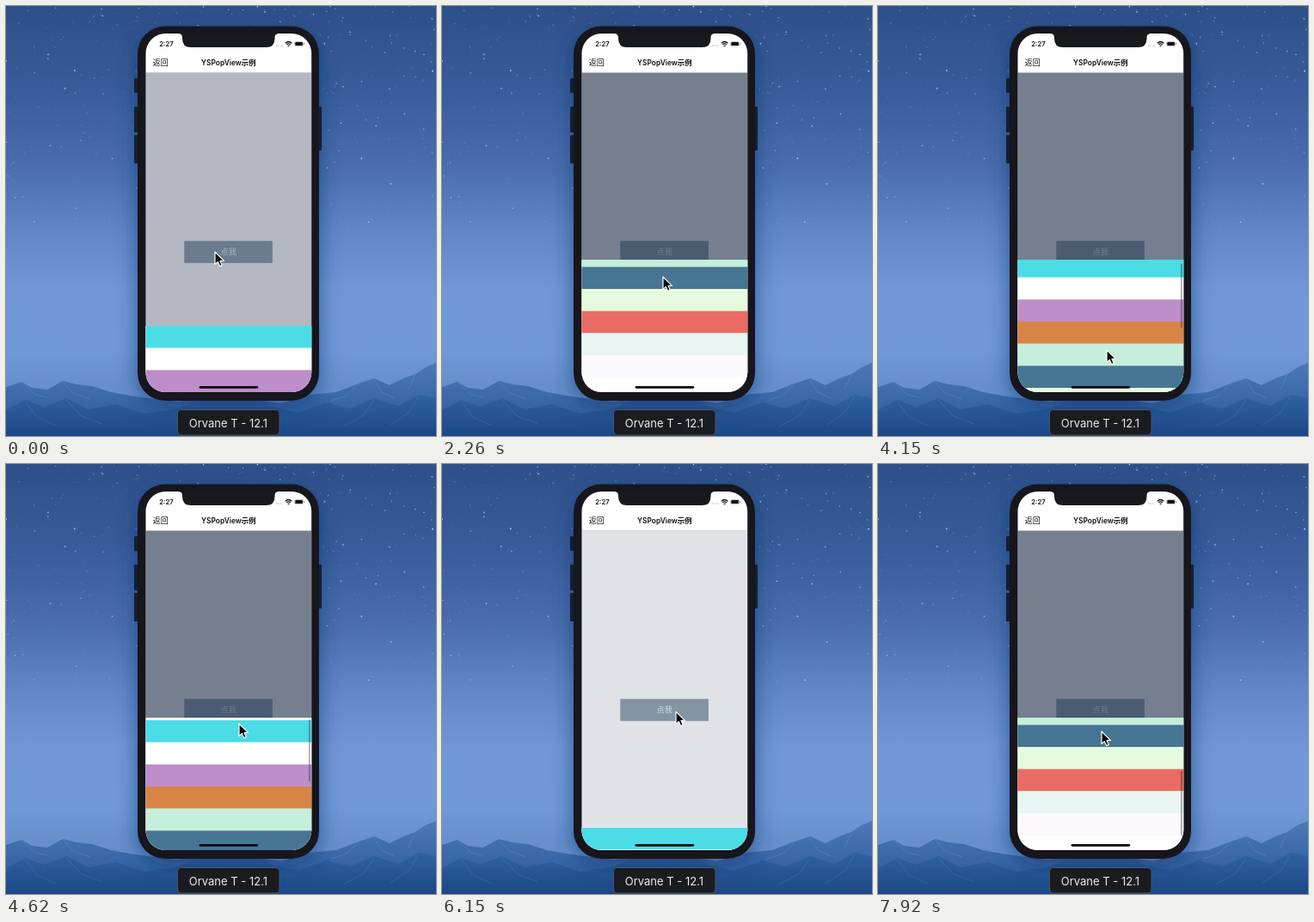
An HTML page that plays this animation: 500x500 px, repeating every 8000 ms.

```html
<!DOCTYPE html>
<html lang="zh">
<head>
<meta charset="utf-8">
<title>YSPopView示例</title>
<style>
  html, body { margin: 0; width: 100%; height: 100%; overflow: hidden; background: #2f528a; }
  svg { display: block; width: 100vw; height: 100vh; }
  text { font-family: Inter, "Noto Sans CJK SC", "Noto Sans CJK", sans-serif; }
</style>
</head>
<body>
<svg id="stage" viewBox="0 0 500 500">
  <defs>
    <linearGradient id="sky" x2="0" y2="1">
      <stop offset="0" stop-color="#2e5089"/>
      <stop offset=".2" stop-color="#395d9b"/>
      <stop offset=".38" stop-color="#4a6eae"/>
      <stop offset=".52" stop-color="#6086c6"/>
      <stop offset=".66" stop-color="#7197d6"/>
      <stop offset=".8" stop-color="#7099d8"/>
      <stop offset=".88" stop-color="#668fcc"/>
    </linearGradient>
    <linearGradient id="far" x2="0" y2="1">
      <stop offset="0" stop-color="#4c78b6"/>
      <stop offset="1" stop-color="#28579a"/>
    </linearGradient>
    <linearGradient id="near" x2="0" y2="1">
      <stop offset="0" stop-color="#2f62a3"/>
      <stop offset="1" stop-color="#1c4786"/>
    </linearGradient>
    <filter id="shade" x="-30%" y="-20%" width="160%" height="140%">
      <feDropShadow dx="0" dy="7" stdDeviation="13" flood-color="#17336c" flood-opacity=".6"/>
    </filter>
    <clipPath id="screen"><rect x="162.5" y="32" width="192.7" height="417" rx="23"/></clipPath>
    <clipPath id="list"><rect id="window" x="162" y="295" width="194" height="154"/></clipPath>
  </defs>

  <rect width="500" height="500" fill="url(#sky)"/>
  <g id="stars" fill="#dce9ff"/>
  <path fill="url(#far)" d="M0 443L18 437 30 444 48 446 66 436 82 440 100 442 122 449 150 454 200 460 258 452 320 462 352 452 384 449 410 439 428 433 446 441 462 433 476 428 488 420 500 415V500H0Z"/>
  <path fill="url(#near)" d="M0 470L22 458 44 466 70 456 96 469 128 463 160 474 200 468 226 456 250 452 290 455 310 466 340 473 372 461 400 468 428 456 456 465 480 452 500 456V500H0Z"/>
  <g fill="none" stroke="#6c95cb" stroke-opacity=".4">
    <path d="M18 438L34 452 48 455M66 437L78 450 98 457M410 440L396 453 378 459M428 435L437 449 452 456M476 429L468 446"/>
    <path d="M22 459L36 478 58 488M70 458L88 477 112 486M428 458L416 476 392 489M480 454L468 473 446 488" stroke-opacity=".25"/>
  </g>

  <g fill="#18191c">
    <rect x="149" y="84" width="6" height="17" rx="1"/>
    <rect x="149" y="117" width="6" height="30" rx="1"/>
    <rect x="149" y="150" width="6" height="33" rx="1"/>
    <rect x="361" y="117" width="6" height="51" rx="1"/>
    <rect x="153" y="23.5" width="211" height="435.5" rx="32" filter="url(#shade)"/>
  </g>

  <g clip-path="url(#screen)">
    <rect x="162" y="32" width="194" height="417" fill="#fff"/>
    <rect x="207.3" y="273.2" width="102.6" height="25.6" fill="#94a5b4"/>
    <text x="258.7" y="289.3" font-size="9.2" text-anchor="middle" fill="#f4f6f8">点我</text>
    <rect id="dim" x="162" y="77.7" width="194" height="372" fill="#1c2b46"/>
    <g clip-path="url(#list)">
      <rect x="162" y="295" width="194" height="154" fill="#fff"/>
      <g id="rows"/>
      <rect id="bar" x="352.2" width="1.4" rx=".7" fill="#000" fill-opacity=".4"/>
    </g>
    <rect x="162" y="77.2" width="194" height=".5" fill="#000" fill-opacity=".22"/>
    <text x="170.8" y="69.3" font-size="9" fill="#111">返回</text>
    <text x="258.8" y="69.3" font-size="8.4" font-weight="600" text-anchor="middle" fill="#111">YSPopView示例</text>
    <text x="178.3" y="47" font-size="7.6" font-weight="600" fill="#111">2:27</text>
    <g fill="#999">
      <circle cx="314.6" cy="46" r=".6"/><circle cx="316.8" cy="46" r=".6"/>
      <circle cx="319" cy="46" r=".6"/><circle cx="321.2" cy="46" r=".6"/>
    </g>
    <g fill="none" stroke="#111" stroke-width="1.2">
      <path d="M324.8 43.2Q328.6 39.8 332.4 43.2M326.2 44.9Q328.6 42.8 331 44.9"/>
      <path d="M327.6 46.3H329.6"/>
    </g>
    <rect x="335.6" y="41.4" width="10" height="5.4" rx="1.5" fill="none" stroke="#888" stroke-width=".5"/>
    <rect x="336.3" y="42.1" width="8.6" height="4" rx=".9" fill="#111"/>
    <rect x="346.2" y="43.2" width=".9" height="1.8" fill="#888"/>
    <path fill="#18191c" d="M200 30V32Q205 32 205 36.5V38Q205 48 215 48H302.5Q312.5 48 312.5 38V36.5Q312.5 32 317.5 32V30Z"/>
    <rect x="224.6" y="442" width="68.6" height="2.7" rx="1.35" fill="#080808"/>
  </g>

  <rect x="199.5" y="469.5" width="118.5" height="29.5" rx="4" fill="#1b1c1f" stroke="#4b5668"/>
  <text x="258.4" y="489.6" font-size="13" text-anchor="middle" fill="#ececec">Orvane T - 12.1</text>

  <path id="cursor" fill="#000" stroke="#fff" stroke-width="1.2" stroke-linejoin="round" d="M0 0V14.4L3.3 11.4 5.6 16.6 8.3 15.4 6 10.4H10.5Z"/>
</svg>
<script>
const LOOP = 8000, TICK = 118.1;
const TOP = 295, VIEW = 154, ROW = 25.67, REST = 120;
const COLORS = ['#4cdce5', '#ffffff', '#bd8ec9', '#d88446', '#c5efda',
                '#477594', '#e6fade', '#e86c63', '#e8f5f3', '#fbf9fe'];

// Key tables: [tick, value...]
const SLIDE = [[0, .5], [1, .88], [2, 1], [43, 1], [44, .5], [45, .1], [46, 0],
               [51, 0], [52, .17], [53, .65], [54, .95], [55, 1]];
const SCROLL = [[6, 0], [7, 9], [8, 32], [9, 57], [10, 72], [15, 72], [16, 90], [17, 122],
                [18, 123], [19, 120], [25, 120], [26, 126], [28, 148], [29, 129], [30, 123],
                [32, 120], [33, 96], [35, 5], [36, -22], [37, -12], [39, -3], [40, 0],
                [58, 0], [59, 14], [62, 112], [63, 128], [65, 122], [67, 120]];
const POINTER = [[2, 243, 286], [5, 264, 327], [6, 264, 327], [7, 264, 318], [8, 262, 295],
                 [10, 257, 255], [11, 257, 255], [14, 257, 377], [15, 257, 377], [19, 257, 315],
                 [20, 257, 315], [24, 251, 355], [25, 251, 355], [28, 252, 266], [29, 252, 270],
                 [32, 258, 298], [35, 266, 400], [39, 271, 302], [43, 270, 269], [46, 270, 269],
                 [47, 272, 288], [53, 272, 288], [56, 270, 338], [58, 268, 350],
                 [62, 262, 237], [65, 260, 303], [67, 260, 311]];
const BAR_ON = [[7, 9], [16, 18], [26, 31], [33, 39], [59, 67]];

const $ = id => document.getElementById(id);
const set = (el, attrs) => { for (const k in attrs) el.setAttribute(k, attrs[k]); };
function add(parent, tag, attrs) {
  const el = document.createElementNS('http://www.w3.org/2000/svg', tag);
  set(el, attrs);
  parent.append(el);
}

function sample(keys, n) {
  const i = keys.findIndex(k => k[0] >= n);
  if (i < 0) return keys[keys.length - 1].slice(1);
  if (i === 0) return keys[0].slice(1);
  const a = keys[i - 1], b = keys[i], u = (n - a[0]) / (b[0] - a[0]);
  return a.slice(1).map((v, j) => v + (b[j + 1] - v) * u);
}

let seed = 41;
const rand = () => (seed = seed * 16807 % 2147483647) / 2147483647;
for (let i = 0; i < 520; i++) {
  add($('stars'), 'circle', {
    cx: (rand() * 500).toFixed(1), cy: (260 * rand() ** 1.5).toFixed(1),
    r: (.3 + .65 * rand() ** 3).toFixed(2), opacity: (.25 + .6 * rand()).toFixed(2)
  });
}
COLORS.forEach((fill, i) =>
  add($('rows'), 'rect', { x: 162, y: TOP + i * ROW, width: 194, height: ROW + .1, fill }));

function draw(t) {
  const n = Math.floor(t / TICK);
  const [shown] = sample(SLIDE, n), [off] = sample(SCROLL, n), [x, y] = sample(POINTER, n);
  const drop = VIEW * (1 - shown);
  set($('dim'), { opacity: .6 * shown ** .85 });
  set($('window'), { y: TOP + drop });
  set($('rows'), { transform: `translate(0 ${drop - off})` });

  const over = Math.max(0, -off, off - REST);
  const pos = Math.min(REST, Math.max(0, off)) / REST;
  const on = BAR_ON.some(([a, b]) => n >= a && n <= b);
  set($('bar'), { y: TOP + 2 + 60 * pos + (off > REST ? over : 0), height: 75 - over, opacity: +on });
  set($('cursor'), { transform: `translate(${x} ${y})` });
}

const start = performance.now();
function loop() {
  draw((performance.now() - start) % LOOP);
  requestAnimationFrame(loop);
}
loop();
</script>
</body>
</html>
```
